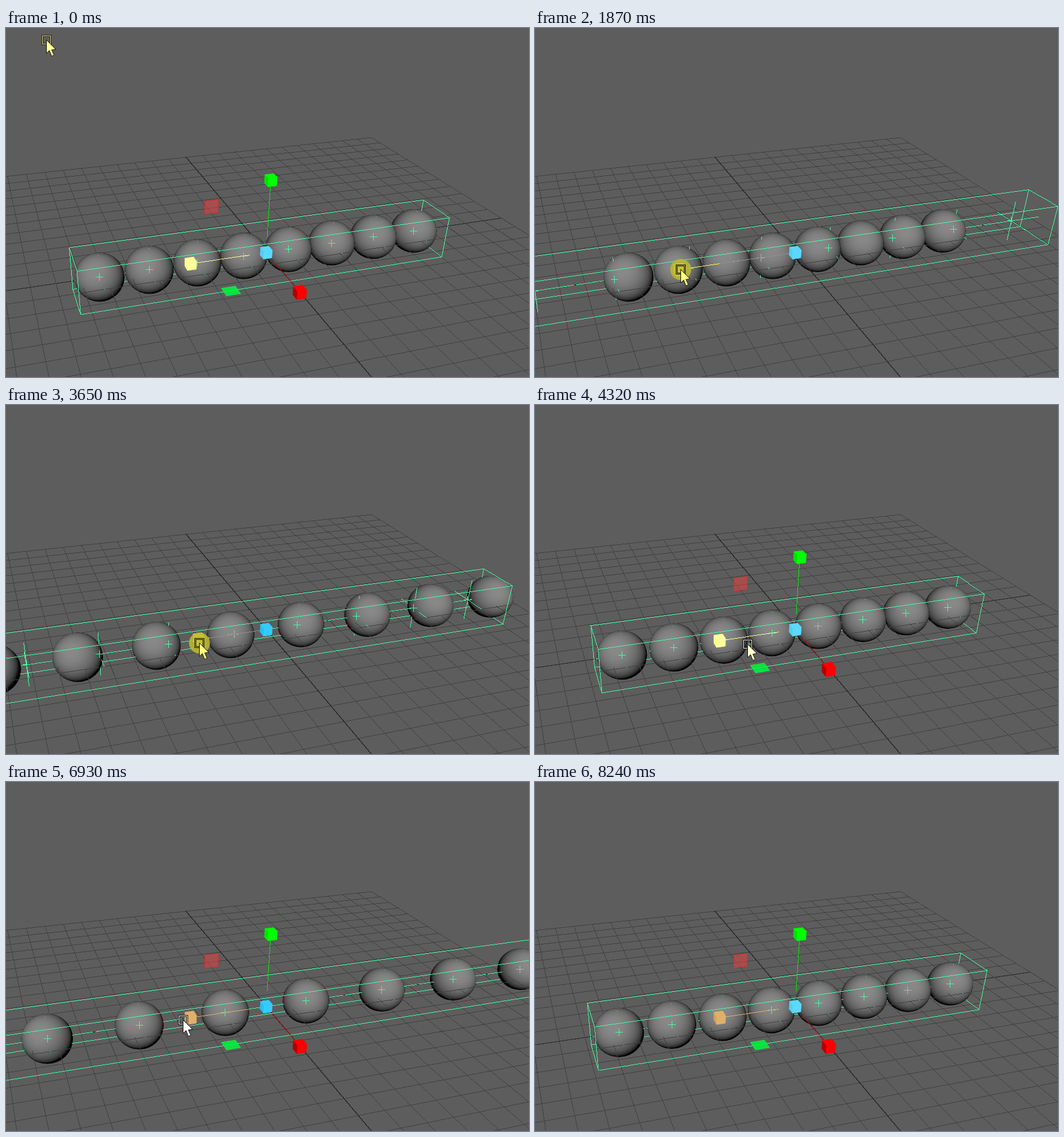
These frames come from a looping animation (899x599 px, 8.99 s). An HTML page with a canvas:

```html
<!DOCTYPE html>
<html lang="en">
<head>
<meta charset="utf-8">
<title>Scaling a row of spheres</title>
<style>
  html, body { margin: 0; width: 100%; height: 100%; overflow: hidden; background: #5d5d5d; }
  canvas { display: block; }
</style>
</head>
<body>
<canvas id="view" width="899" height="599"></canvas>
<script>
const W = 899, H = 599, LOOP = 8990, STEP = 93.65, LAST = 88;
const GREEN = '#43ffa3', GRID = '#404040', AXIS = '#2a2a2a';
const REST = 2.07, REACH = 3.4;
const view = document.getElementById('view').getContext('2d');

// Camera: screen = (X / w, Y / w) for a world point [x, h, s]; s runs along the row.
const CAM = [
  [2.933, -4.7, 40.88, 447.2],
  [7.45, -40.6, -2.177, 385.5],
  [-0.02783, -0.0155, 0.008467, 1]
];

const dot = (a, b) => a[0] * b[0] + a[1] * b[1] + a[2] * b[2];
const cross = (a, b) => [a[1] * b[2] - a[2] * b[1], a[2] * b[0] - a[0] * b[2], a[0] * b[1] - a[1] * b[0]];
const mix = (a, b, k) => a.map((v, i) => v + (b[i] - v) * k);
const homog = p => CAM.map(r => dot(r, p) + r[3]);
const project = p => { const [x, y, w] = homog(p); return [x / w, y / w]; };
const offsets = d => Array.from({ length: 8 }, (_, i) => (i - 3.5) * d);

const EYE = (([a, b, c]) => {
  const bc = cross(b, c), ca = cross(c, a), ab = cross(a, b), det = dot(a, bc);
  return bc.map((v, i) => -(v * a[3] + ca[i] * b[3] + ab[i] * c[3]) / det);
})(CAM);

// Each act: the cursor glides to the handle, then drags it to a new row spacing.
// Times are in steps; the spheres follow two steps after release.
const intro = { drop: [69, 20], gap: REST, odd: 3 };
const acts = [
  { glide: [0.5, 10.5], bow: [255, 0], grab: [315, 404], drag: [16, 21], drop: [243, 415], gap: 3.25, odd: 7 },
  { glide: [22.5, 31.5], bow: [0, 15], grab: [317, 407], drag: [36, 44], drop: [365, 410], gap: 2.146, odd: 4 },
  { glide: [51.5, 58.5], bow: [0, 0], grab: [308, 406], drag: [59.5, 62.95], drop: [203, 416], gap: 3.735, odd: 7 },
  { glide: [68, 74], bow: [0, 0], grab: [304, 408], drag: [75, 84], drop: [371, 405], gap: 2.181, odd: 6 },
  { glide: [84, LAST], bow: [0, 0], grab: [400, 620], drag: [99, 100], drop: [400, 620], gap: 2.181, odd: 6 }
];

function ease(n, [from, to]) {
  const k = Math.min(1, Math.max(0, (n - from) / (to - from)));
  return k * k * (3 - 2 * k);
}

function stateAt(n) {
  const i = acts.findIndex(a => n < a.drag[1]);
  const act = acts[i], before = acts[i - 1] || intro;
  const pull = ease(n, act.drag), way = ease(n, act.glide);
  const pressed = n >= act.drag[0];
  const released = i ? before.drag[1] : 0;
  const settled = acts.filter(a => n >= a.drag[1] + 2).pop() || intro;
  const glide = mix(before.drop, act.grab, way)
    .map((v, j) => v + act.bow[j] * Math.sin(Math.PI * way));
  const spread = before.gap + (act.gap - before.gap) * pull;
  return {
    pressed, spread, gap: settled.gap,
    hover: !pressed && n >= act.glide[1] - 1,
    odd: pressed ? 3 : settled.odd,
    ratio: spread / before.gap,
    cursor: pressed ? mix(act.grab, act.drop, pull) : glide,
    ink: `rgb(255,255,${pressed ? 130 : Math.min(255, 155 + 25 * (n - released))})`
  };
}

// Hard-edged one pixel line.
function line(g, a, b, color) {
  const dx = b[0] - a[0], dy = b[1] - a[1];
  const n = Math.max(1, Math.ceil(Math.max(Math.abs(dx), Math.abs(dy))));
  g.fillStyle = color;
  for (let i = 0; i <= n; i++) {
    const x = Math.floor(a[0] + dx * i / n), y = Math.floor(a[1] + dy * i / n);
    if (x >= 0 && y >= 0 && x < W && y < H) g.fillRect(x, y, 1, 1);
  }
}
const edge = (g, a, b, color) => line(g, project(a), project(b), color);

function hidden(p, centers) {
  const ray = EYE.map((v, i) => v - p[i]), len2 = dot(ray, ray);
  return centers.some(s => {
    const to = [-p[0], -p[1], s - p[2]];
    const k = Math.max(0, dot(to, ray) / len2);
    const miss = to.map((v, i) => v - ray[i] * k);
    return dot(miss, miss) < 0.97;
  });
}

// World segment drawn only where no sphere covers it.
function solid(a, b, color, centers) {
  const p = project(a), q = project(b);
  const n = Math.max(2, Math.ceil(Math.hypot(q[0] - p[0], q[1] - p[1]) / 2));
  let from = null, last = null;
  for (let i = 0; i <= n; i++) {
    const pt = mix(a, b, i / n);
    if (hidden(pt, centers)) {
      if (from) edge(view, from, last, color);
      from = null;
    } else {
      from = from || pt;
      last = pt;
    }
  }
  if (from) edge(view, from, last, color);
}

const floor = document.createElement('canvas');
floor.width = W;
floor.height = H;
(function paintFloor(g) {
  g.fillStyle = '#5d5d5d';
  g.fillRect(0, 0, W, H);
  const pair = (k, color) => {
    edge(g, [k, 0, -12], [k, 0, 12], color);
    edge(g, [-12, 0, k], [12, 0, k], color);
  };
  for (let k = -12; k <= 12; k++) if (k) pair(k, GRID);
  pair(0, AXIS);
  g.translate(1, 0);
  pair(0, AXIS);
})(floor.getContext('2d'));

// Unit sphere: exact outline, lit by nested contours of equal light.
function sphere(s) {
  const m = homog([0, 0, s]);
  const c = (i, j) => dot(CAM[i], CAM[j]) - m[i] * m[j];
  const x = c(0, 2) / c(2, 2), y = c(1, 2) / c(2, 2);
  const rx = Math.sqrt(x * x - c(0, 0) / c(2, 2));
  const ry = Math.sqrt(y * y - c(1, 1) / c(2, 2));
  const lx = (x - W / 2) / 1250, ly = -0.25;
  const tilt = Math.hypot(lx, ly), turn = Math.atan2(ly, lx);
  view.save();
  view.translate(x, y);
  view.scale(rx, ry);
  view.beginPath();
  view.arc(0, 0, 1, 0, 7);
  view.fillStyle = '#000';
  view.fill();
  view.clip();
  for (let k = 0; k < 1; k += 0.02) {
    const r = Math.sqrt(1 - k * k), v = Math.round(138 * k ** 0.6);
    view.fillStyle = `rgb(${v},${v},${v})`;
    view.beginPath();
    view.ellipse(k * lx, k * ly, r * Math.sqrt(1 - tilt * tilt), r, turn, 0, 7);
    view.fill();
  }
  view.restore();
}

function floorOver(centers) {
  solid([1, 0, -12], [1, 0, 12], GRID, centers);
  for (let k = -12; k <= 12; k++) solid([0, 0, k], [2, 0, k], k ? GRID : AXIS, centers);
}

function box(end, centers) {
  for (const a of [-1, 1]) for (const b of [-1, 1]) {
    solid([a, b, -end], [a, b, end], GREEN, centers);
    solid([a, -1, b * end], [a, 1, b * end], GREEN, centers);
    solid([-1, a, b * end], [1, a, b * end], GREEN, centers);
  }
}

function locators(spread, centers, odd) {
  const arm = spread / REST;
  offsets(spread).forEach((s, i) => {
    solid([-1, 0, s], [1, 0, s], GREEN, centers);
    solid([0, -1, s], [0, 1, s], GREEN, centers);
    solid([0, 0, s - arm], [0, 0, s + arm], GREEN, centers);
    const [x, y] = project([0, 0, s]), ink = i === odd ? '#b4b4b4' : GREEN;
    line(view, [x - 6, y], [x + 6, y], ink);
    line(view, [x, y - 6], [x, y + 6], ink);
  });
}

function poly(points, fill, stroke) {
  view.beginPath();
  points.forEach(p => view.lineTo(p[0], p[1]));
  view.closePath();
  view.fillStyle = fill;
  view.fill();
  view.strokeStyle = stroke;
  view.lineWidth = 1;
  view.stroke();
}

// Square of half size k placed in the world by f.
const quad = (k, f) => [[-k, -k], [k, -k], [k, k], [-k, k]].map(([a, b]) => project(f(a, b)));

function cube([x, h, s], face, dark) {
  const k = 0.19;
  poly(quad(k, (a, b) => [x + a, h + b, s - k]), dark, dark);
  poly(quad(k, (a, b) => [x + k, h + a, s + b]), face, face);
  poly(quad(k, (a, b) => [x + a, h + k, s + b]), face, face);
}

function gizmo({ pressed, hover, ratio, gap }) {
  const near = 0.77, mid = 2.53, wide = gap > 3;
  if (pressed) {
    const tip = [0, 0, -REACH * ratio];
    edge(view, [0, 0, 0], tip, '#ffff66');
    edge(view, [0, 0, 0], [0, 0, -REACH], '#8f8f8f');
    cube(tip, '#ffff5c', '#f0f050');
  } else {
    poly(quad(0.29, (a, b) => [0, mid + a, b - mid]), 'rgba(255,60,60,.45)', '#e02828');
    poly(quad(0.29, (a, b) => [mid + a, 0, b - mid]), 'rgba(0,244,60,.88)', '#18e848');
    edge(view, [near, 0, 0], [REACH, 0, 0], '#e80000');
    edge(view, [0, near, 0], [0, REACH, 0], '#00f000');
    cube([REACH, 0, 0], '#ff0000', '#b40000');
    cube([0, REACH, 0], '#00ff00', '#00e000');
    const tint = hover ? '#dfb06c' : wide ? '#ffff70' : '#ffff99';
    edge(view, [0, 0, -near], [0, 0, -REACH], tint);
    cube([0, 0, -REACH], tint, hover ? '#d0a060' : wide ? '#f4f466' : '#fbfb90');
  }
  cube([0, 0, 0], wide ? '#33ccff' : '#5cd9ff', wide ? '#2cbcf0' : '#54ccf4');
}

const arrow = [[0, 0], [0, 23], [5, 18], [9, 28], [13, 26], [9, 17], [16, 16]];

function pointer({ cursor, ink, pressed }) {
  const [x, y] = cursor.map(v => Math.round(v) + 0.5);
  if (pressed) {
    view.fillStyle = 'rgba(190,184,46,.88)';
    view.beginPath();
    view.arc(x, y, 18, 0, 7);
    view.fill();
  }
  view.lineWidth = 1;
  for (let r = 8; r > 5; r--) {
    view.strokeStyle = r === 7 ? (pressed ? '#b5b03a' : ink) : '#111';
    view.strokeRect(x - r, y - r, r * 2, r * 2);
  }
  poly(arrow.map(p => [p[0] + x, p[1] + y]), ink, '#111');
}

function draw(n) {
  const now = stateAt(n), centers = offsets(now.gap);
  view.drawImage(floor, 0, 0);
  centers.slice().reverse().forEach(sphere);
  floorOver(centers);
  box(3.5 * now.spread + now.spread / REST, centers);
  locators(now.spread, centers, now.odd);
  gizmo(now);
  pointer(now);
}

let shown = -1;
const start = performance.now();
function tick() {
  const t = Math.max(0, performance.now() - start) % LOOP;
  const n = Math.min(LAST, Math.floor(t / STEP + 0.08));
  if (n !== shown) draw(shown = n);
  requestAnimationFrame(tick);
}
tick();
</script>
</body>
</html>
```
